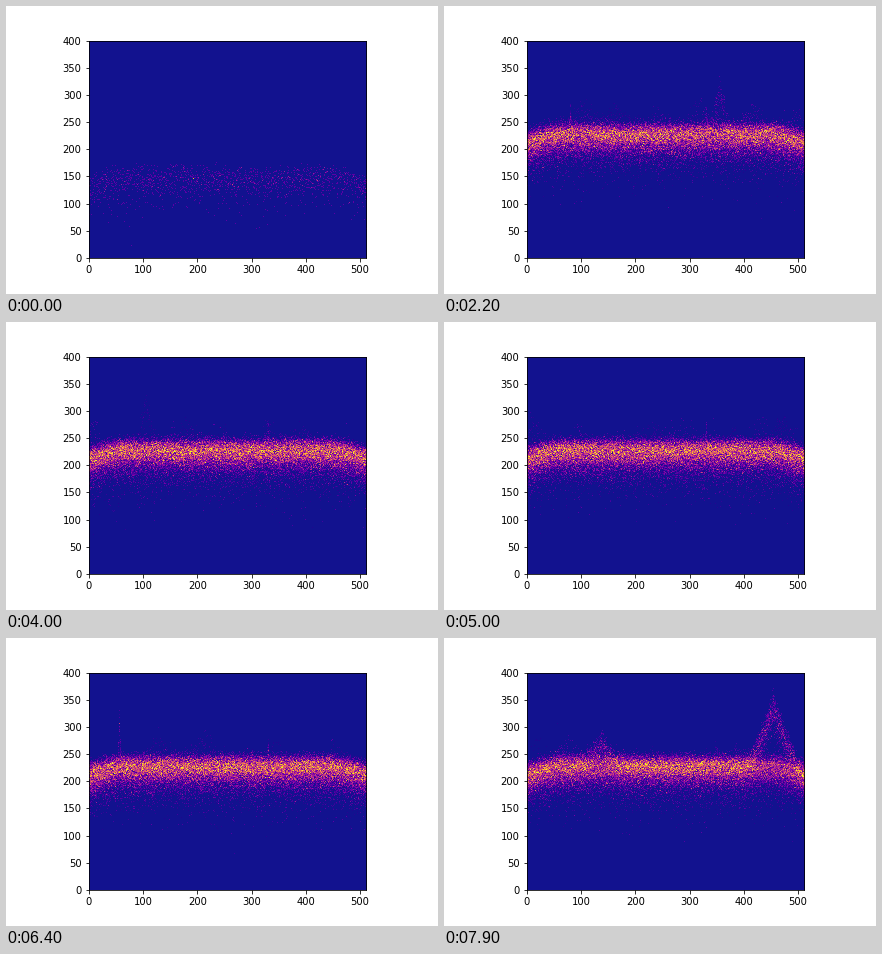
A matplotlib script for the animation above (8 s loop, 432 by 288 pixels).

```python
import numpy as np
import matplotlib.pyplot as plt
from matplotlib.animation import FuncAnimation
from matplotlib.colors import ListedColormap

FRAMES, INTERVAL = 80, 100
BINS, ROWS = 512, 401
SWEEPS = 20        # spectra added per frame
DECAY = 0.85       # persistence kept from one frame to the next
SPREAD = 15.0      # rows per neper of noise power
FLOOR, START = 227, 147

CARRIERS = {80: 26, 330: 64}   # bin: frame where it stops
# centre, half width, height over the floor, frame of most activity, duty
HOPS = [
    (310, 70, 70, 5, 0.07),
    (355, 18, 95, 20, 0.16),
    (105, 20, 95, 33, 0.07),
    (56, 3, 85, 62, 0.3),
    (136, 26, 42, 78, 0.45),
    (453, 42, 118, 78, 0.65),
]

bins = np.arange(BINS)
edge = np.minimum(bins, BINS - 1 - bins)
floor = FLOOR - 14 * np.clip(1 - edge / 62, 0, 1) ** 1.4


def minor_hops(rng, count=45):
    """Faint short signals scattered over band and time."""
    for _ in range(count):
        yield (rng.uniform(0, BINS), rng.uniform(4, 35), rng.uniform(28, 60),
               rng.uniform(3, FRAMES), rng.uniform(0.03, 0.07))


def add_tone(level, centre, half, height):
    tone = FLOOR + height * (1 - np.abs(bins - centre) / half)
    return SPREAD * np.logaddexp(level / SPREAD, tone / SPREAD)


def noise(rng):
    """Log power of windowed noise, so neighbouring bins are related."""
    z = rng.normal(size=BINS) + 1j * rng.normal(size=BINS)
    z -= (np.roll(z, 1) + np.roll(z, -1)) / 2
    return SPREAD * np.log(np.abs(z) ** 2 / 3)


def sweep(rng, i, hops):
    level = floor - (FLOOR - START) * 0.35 ** i + rng.normal(0, 2)
    for centre, stop in CARRIERS.items():
        if 0 < i < stop and rng.random() < 0.25:
            level = add_tone(level, centre, 2, 32)
    for centre, half, height, peak, duty in hops:
        if rng.random() < duty * np.exp(-((i - peak) / 3) ** 2):
            level = add_tone(level, centre, half,
                             height * rng.uniform(0.85, 1))
    return level + noise(rng)


def build():
    rng = np.random.default_rng(7)
    hops = HOPS + list(minor_hops(rng))
    hist = np.zeros((ROWS, BINS))
    for i in range(FRAMES):
        hist *= DECAY
        for _ in range(SWEEPS if i else SWEEPS // 2):
            rows = np.clip(sweep(rng, i, hops), 0, ROWS - 1).astype(int)
            hist[rows, bins] += 1
        yield hist.astype(np.float32)


history = list(build())

cmap = ListedColormap(plt.get_cmap("plasma")(np.linspace(0.03, 1, 256)))
cmap.set_under("#12128f")

fig = plt.figure(figsize=(6, 4), dpi=72)
fig.subplots_adjust(left=0.125, right=0.9, bottom=0.125, top=0.88)
ax = fig.add_subplot()
image = ax.imshow(history[0], cmap=cmap, vmin=0.2, vmax=5.8,
                  origin="lower", interpolation="nearest")
ax.set_xticks(range(0, 501, 100))
ax.set_yticks(range(0, 401, 50))


def update(i):
    image.set_data(history[i])
    return [image]


anim = FuncAnimation(fig, update, frames=FRAMES, interval=INTERVAL,
                     repeat=True, repeat_delay=0)
plt.show()
```
